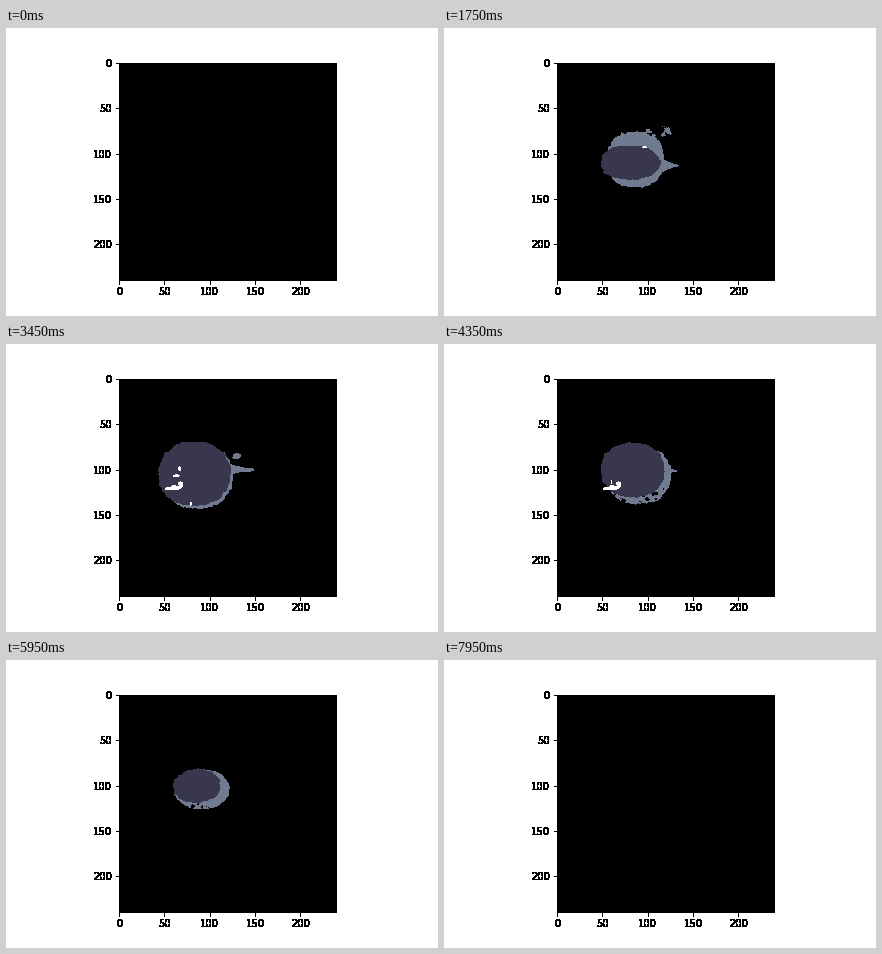
Write a matplotlib script that moves like this. It is 432 px wide and 288 px high and loops after 7.97 s.

```python
import numpy as np
import matplotlib.pyplot as plt
from matplotlib.animation import FuncAnimation

LOOP, STEP, SIZE, LAST = 7970, 10, 240, 80

# Key boxes in screen pixels: slice, left, right, top, bottom.
OUTER = [(1, 197, 207, 144, 152), (8, 170, 221, 113, 160), (18, 162, 220, 104, 160),
         (24, 156, 224, 103, 163), (35, 156, 226, 100, 165), (52, 168, 226, 104, 157),
         (64, 169, 221, 113, 146), (69, 173, 218, 124, 144), (79, 190, 200, 132, 138)]
INNER = [(9, 180, 186, 132, 136), (18, 156, 215, 118, 152), (24, 153, 221, 105, 158),
         (35, 152, 224, 98, 162), (52, 160, 217, 101, 146), (64, 171, 212, 114, 142),
         (69, 173, 213, 128, 143), (76, 188, 196, 132, 138)]
ISLANDS = [(15, 202, 228, 99, 109), (18, 202, 228, 99, 109), (24, 215, 234, 103, 117),
           (35, 226, 234, 110, 115), (39, 229, 232, 111, 113)]
SPIKE = [(4, 225, 142), (8, 235, 141), (24, 234, 136),
         (35, 248, 126), (41, 247, 126), (46, 222, 128)]  # slice, tip x, tip y
SPECKS = [(16, 20, 200, 120, 2, 1), (21, 28, 218, 120, 2, 3), (22, 30, 170, 139, 1, 1),
          (30, 44, 168, 144, 7, 2), (30, 44, 174, 141, 2, 3), (32, 40, 173, 125, 1, 2),
          (32, 40, 170, 132, 3, 1), (33, 38, 184, 160, 1, 2),
          (44, 56, 167, 138, 1, 2), (47, 58, 184, 146, 3, 1)]  # from, to, x, y, rx, ry

fig, ax = plt.subplots(figsize=(6, 4), dpi=72)
fig.subplots_adjust(left=.125, right=.9, bottom=.125, top=.88)
im = ax.imshow(np.zeros((SIZE, SIZE)), cmap="bone", vmin=0, vmax=4,
               interpolation="nearest")

# Draw the frame once with hard-edged black text and ticks.
fig.canvas.draw()
page = np.asarray(fig.canvas.buffer_rgba())[..., :3]
paper = np.where(page.min(axis=2) < 255, 0, 255).astype(np.uint8)
fig.figimage(np.dstack([paper] * 3))
ax.set_axis_off()
ax.set_zorder(1)

box = ax.get_position()
idx = (np.arange(SIZE) + .5) / SIZE
X, Y = np.meshgrid((box.x0 + box.width * idx) * 432,
                   (1 - box.y1 + box.height * idx) * 288)


def noise(seed):
    grid = np.random.default_rng(seed).normal(size=(SIZE, SIZE))
    for axis in (0, 1, 0, 1):
        grid = sum(np.roll(grid, k, axis) for k in (-1, 0, 1))
    return grid / grid.std()


GRAIN = noise(4)


def at(keys, n):
    slices, *cols = zip(*keys)
    return [np.interp(n, slices, col) for col in cols]


def within(keys, n):
    return keys[0][0] <= n <= keys[-1][0]


def blob(keys, n):
    """Rough superellipse that turns into a tilted lens in the late slices."""
    if not within(keys, n):
        return np.zeros((SIZE, SIZE), bool)
    left, right, top, bottom = at(keys, n)
    cx, cy = (left + right) / 2, (top + bottom) / 2
    late = np.interp(n, [58, 69], [0, 1])
    p = 2.2 - .6 * late
    u = abs(X - cx) / (right - left) * 2
    v = abs(Y - cy + .14 * late * (X - cx)) / (bottom - top) * 2
    rough = .8 * GRAIN / (right - left + bottom - top) * 2
    return (u ** p + v ** p) ** (1 / p) < 1 + rough


def spike(n):
    tip_x, tip_y = at(SPIKE, n)
    u = np.clip((X - 216) / (tip_x - 216), 0, 1)
    half = 1.2 + 6.5 * (1 - u) ** 1.6
    return (X > 212) & (X < tip_x) & (abs(Y - tip_y) < half)


def specks(n):
    hit = np.zeros((SIZE, SIZE), bool)
    for start, end, x, y, rx, ry in SPECKS:
        if start <= n <= end:
            hit |= np.hypot((X - x) / rx, (Y - y) / ry) < 1.1 + .15 * GRAIN
    return hit


def label_slice(n):
    out = np.zeros((SIZE, SIZE))
    if n in (0, LAST):
        return out
    late = n >= 66
    rim = blob(OUTER, n)
    if n < 14:
        rim &= GRAIN < .5 + n / 9
    if 44 <= n <= 61:
        rim &= (GRAIN < 1) | (Y < 143)
    if within(SPIKE, n):
        rim |= spike(n)
    rim |= blob(ISLANDS, n) & (GRAIN > np.interp(n, [20, 35], [.3, -1.5]))
    out[rim] = 4 if late else 2
    out[blob(INNER, n)] = 2 if late else 1
    out[specks(n)] = 4
    return out


volume = [label_slice(n) for n in range(LAST + 1)]


def update(i):
    im.set_data(volume[(i * STEP + 50) // 100])
    return [im]


anim = FuncAnimation(fig, update, frames=LOOP // STEP, interval=STEP,
                     repeat=True, repeat_delay=0)
plt.show()
```
